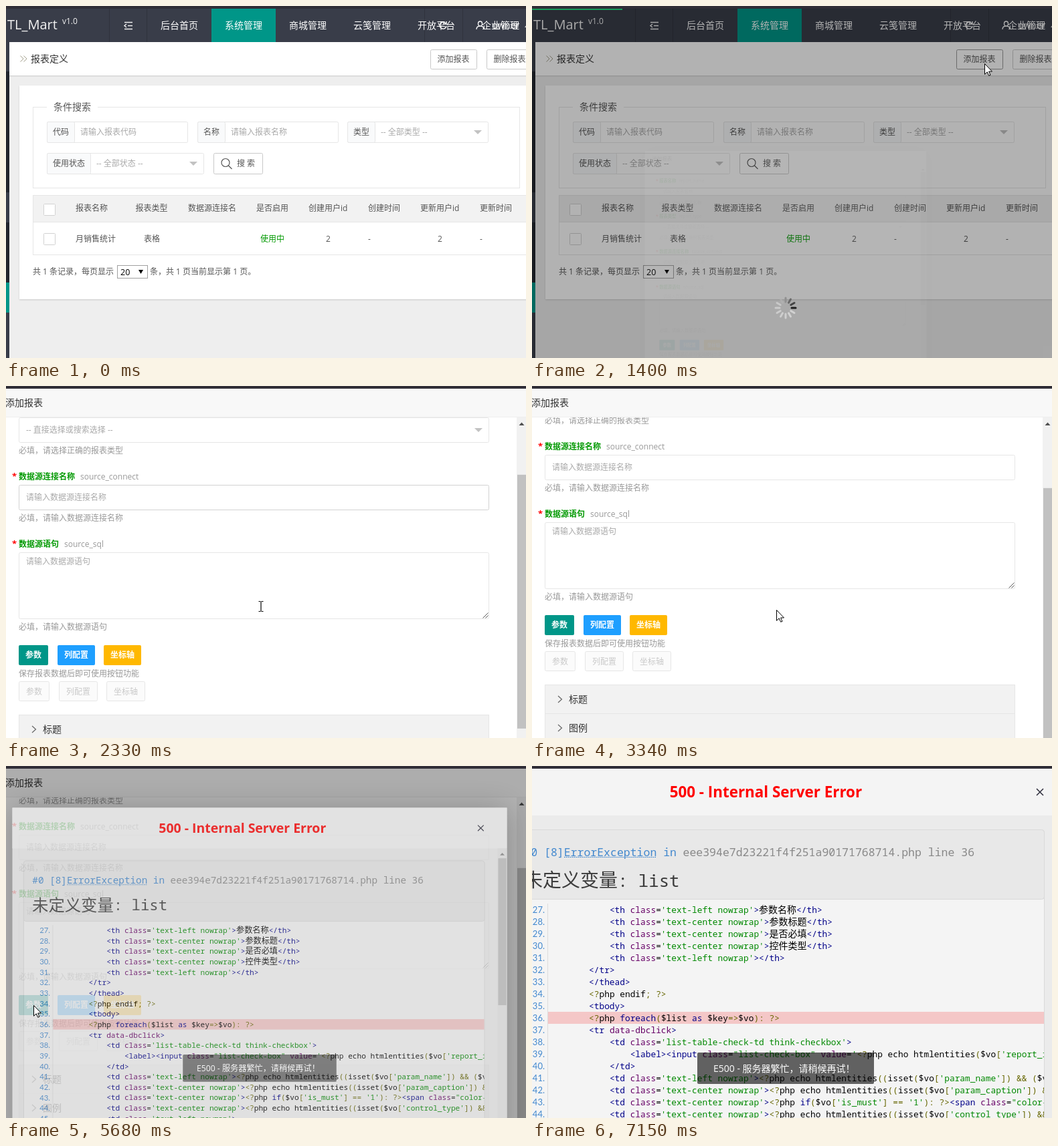
Animation of 777x527 px, one loop 7550 ms. Source, as an HTML page:

```html
<!DOCTYPE html>
<html lang="zh-CN">
<head>
<meta charset="utf-8">
<title>报表定义</title>
<style>
html, body { margin: 0; width: 100%; height: 100%; overflow: hidden; background: #eee; }
svg { display: block; width: 777px; height: 527px; font-family: "Open Sans", "Noto Sans CJK SC", "Noto Sans CJK", sans-serif; }
text { white-space: pre; }
.mono { font-family: "Noto Sans Mono", "Noto Sans CJK SC", monospace; }
.bold { font-weight: 700; }
.sheet { filter: drop-shadow(1px 1px 25px rgba(0, 0, 0, .3)); }
</style>
</head>
<body>
<svg id="stage" viewBox="0 0 777 527"></svg>
<script>
const LOOP = 7550, STEP = 77.75, CX = 379, CY = 452;
const stage = document.getElementById('stage');

function el(parent, tag, attrs = {}, content) {
  const e = document.createElementNS('http://www.w3.org/2000/svg', tag);
  for (const k in attrs) e.setAttribute(k, attrs[k]);
  if (content != null) e.textContent = content;
  parent.append(e);
  return e;
}
const group = (p, attrs) => el(p, 'g', attrs);
const rect = (p, x, y, width, height, fill, more) => el(p, 'rect', { x, y, width, height, fill, ...more });
const box = (p, x, y, w, h, fill, stroke, rx = 1) =>
  rect(p, x + .5, y + .5, w - 1, h - 1, fill, { stroke, rx });
const path = (p, d, stroke, more) => el(p, 'path', { d, fill: 'none', stroke, ...more });
// y is the vertical middle of the line
const text = (p, x, y, s, size = 12, fill = '#555', more) =>
  el(p, 'text', { x, y: y + size * .37, 'font-size': size, fill, ...more }, s);
const caret = (p, x, y) => path(p, `M${x} ${y}h12l-6 6z`, 'none', { fill: '#c2c2c2' });

// ---------- list page ----------
const page = group(stage);
rect(page, 0, 0, 777, 527, '#eee');

[[54, 44, '#393d49'], [98, 181, '#23262e'], [279, 45, '#393d49'], [324, 90, '#23262e'],
 [414, 45, '#009688'], [459, 68, '#393d49']].forEach(([y, h, c]) => rect(page, 0, y, 5, h, c));

rect(page, 5, 105, 772, 1, '#e2e2e2');
rect(page, 5, 104, 772, 1, '#d6d6d6');
rect(page, 5, 54, 772, 50, '#fff');
path(page, 'M21.5 74.500l4.500 4.500l-4.500 4.500M26.500 74.500l4.500 4.500l-4.500 4.500', '#a3a08c');
text(page, 37, 79, '报表定义', 14, '#333');
const addBtn = box(page, 634, 65, 70, 30, '#fff', '#c9c9c9', 2);
text(page, 644.5, 80, '添加报表');
box(page, 718, 65, 70, 30, '#fff', '#c9c9c9', 2);
text(page, 728.5, 80, '删除报表');

rect(page, 0, 4, 777, 50, '#393d49');
rect(page, 307, 4, 96, 50, '#009688');
[154, 210, 625, 682].forEach(x => rect(page, x, 4, 1, 50, '#30333d'));
text(page, 2, 28, 'TL_Mart', 20, '#f2f2f2');
text(page, 84, 23, 'v1.0', 12, '#f2f2f2');
path(page, 'M177 24.500h12M182 29.500h7M177 34.500h12M180 27l-3 2.500l3 2.500', '#eee', { 'stroke-width': 1.5 });
['后台首页', '系统管理', '商城管理', '云笺管理', '开放平台'].forEach((s, i) =>
  text(page, 231 + 96 * i, 29, s, 14, '#fff'));
path(page, 'M657 26a5 5 0 1 0 1 4M658 23v4h-4', '#fff', { 'stroke-width': 1.4 });
path(page, 'M703 35q0-5 5.500-5t5.500 5M705.500 26.500a3 3.500 0 1 0 6 0a3 3.500 0 1 0-6 0', '#fff', { 'stroke-width': 1.3 });
text(page, 711, 29, '企业管理', 14, '#fff');
text(page, 726, 29, 'owner', 14, '#fff');
path(page, 'M775 32l3-4l3 4z', 'none', { fill: '#ddd' });

rect(page, 20, 119, 760, 320, '#fff', { style: 'filter:drop-shadow(0 1px 1px rgba(0,0,0,.15))' });
box(page, 40, 151, 728, 122, 'none', '#e6e6e6', 0);
rect(page, 61, 149, 76, 5, '#fff');
text(page, 71, 151, '条件搜索', 14);

function field(x, y, w, labelW, label, hint, isSelect) {
  box(page, x, y, w, 32, '#fff', '#e6e6e6', 2);
  box(page, x, y, labelW, 32, '#f9fafb', '#e6e6e6', 2);
  text(page, x + 9, y + 16, label);
  text(page, x + labelW + 8, y + 16, hint, 12, '#a9a9a9');
  if (isSelect) caret(page, x + w - 22, y + 13);
}
field(61, 173, 211, 42, '代码', '请输入报表代码');
field(286, 173, 211, 42, '名称', '请输入报表名称');
field(510, 173, 211, 42, '类型', '-- 全部类型 --', true);
field(61, 220, 235, 66, '使用状态', '-- 全部状态 --', true);
box(page, 310, 220, 74, 32, '#fff', '#c9c9c9', 2);
path(page, 'M322 234.500a6 6 0 1 0 12 0a6 6 0 1 0-12 0M332.500 239l5 5', '#555', { 'stroke-width': 1.2 });
text(page, 345, 236, '搜 索');

box(page, 40, 283, 760, 90, '#fff', '#e6e6e6', 0);
box(page, 40, 283, 760, 41, '#f2f2f2', '#e6e6e6', 0);
[296, 340].forEach(y => box(page, 56, y, 18, 18, '#fff', '#d2d2d2', 1));
[[104, '报表名称'], [193.5, '报表类型'], [272, '数据源连接名'], [374, '是否启用'], [452, '创建用户id'],
 [541, '创建时间'], [619, '更新用户id'], [708, '更新时间']].forEach(([x, s]) => text(page, x, 303, s));
[[104, '月销售统计'], [206, '表格'], [380, '使用中', '#090'], [478, '2'], [541, '-'], [645, '2'], [708, '-']]
  .forEach(([x, s, c]) => text(page, x, 348.5, s, 12, c));
text(page, 40, 398, '共 1 条记录，每页显示');
box(page, 166, 388, 46, 20, '#fff', '#a0a0a0', 0);
text(page, 171, 398, '20', 12.5, '#000');
path(page, 'M198 395h7l-3.500 6z', 'none', { fill: '#000' });
text(page, 215, 398, '条，共 1 页当前显示第 1 页。');

const bar = rect(page, 0, 4, 0, 2, '#22df80');
const pageShade = rect(stage, 0, 4, 777, 523, '#000', { 'fill-opacity': .3 });

// ---------- form layer ----------
const form = group(stage);
rect(form, -22, 4, 802, 896, '#fff', { class: 'sheet' });
const body = group(form);

function heading(y, label, name) {
  text(body, 9, y - 1, '*', 13, '#f00', { class: 'bold' });
  text(body, 19, y, label, 12, '#090', { class: 'bold' });
  text(body, 27 + label.length * 12, y, name, 12, '#999');
}
function row(y, label, name, hint, help, h = 38) {
  heading(y, label, name);
  const b = box(body, 19, y + 12, 703, h, '#fff', '#e6e6e6', 2);
  text(body, 30, y + (h > 38 ? 26 : 31), hint, 12, '#a9a9a9');
  text(body, 19, y + h + 24, help, 12, '#999');
  return b;
}
row(89, '报表名称', 'report_name', '请输入报表名称', '必填，请输入报表名称');
row(190, '报表类型', 'report_type', '-- 直接选择或搜索选择 --', '必填，请选择正确的报表类型');
caret(body, 700, 218);
const linkInput = row(291, '数据源连接名称', 'source_connect', '请输入数据源连接名称', '必填，请输入数据源连接名称');
row(392, '数据源语句', 'source_sql', '请输入数据源语句', '必填，请输入数据源语句', 100);
path(body, 'M712.500 502.500l8-8M716.500 502.500l4-4', '#555');

let paramBtn;
[[19, 44, '参数', '#009688'], [77, 56, '列配置', '#1e9fff'], [146, 56, '坐标轴', '#ffb800']].forEach(([x, w, s, c], i) => {
  const b = rect(body, x, 543, w, 30, c, { rx: 2 });
  if (!i) paramBtn = b;
  text(body, x + 10, 558, s, 12, '#fff', { class: 'bold' });
});
text(body, 19, 585.5, '保存报表数据后即可使用按钮功能', 12, '#999');
[[19, 46, '参数'], [79, 58, '列配置'], [150, 58, '坐标轴']].forEach(([x, w, s]) => {
  box(body, x, 597, w, 30, '#fbfbfb', '#e6e6e6', 2);
  text(body, x + 11, 612.5, s, 12, '#c9c9c9');
});
['标题', '图例', '提示框', '工具栏', '网格'].forEach((s, i) => {
  const y = 647 + 43 * i;
  box(body, 19, y, 703, 44, '#f2f2f2', '#e6e6e6', 0);
  path(body, `M39 ${y + 17}l5.500 5l-5.500 5`, '#666', { 'stroke-width': 1.2 });
  text(body, 55, y + 22, s, 14, '#333');
});

rect(form, 763, 47, 17, 853, '#f1f1f1');
const thumb = rect(form, 764, 64, 15, 380, '#c1c1c1');
path(form, 'M766.500 59h8l-4-4.500z', 'none', { fill: '#505050' });
rect(form, -22, 4, 802, 42, '#f8f8f8');
rect(form, -22, 46, 802, 1, '#eee');
text(form, -1, 25, '添加报表', 14, '#333');

const formShade = rect(stage, 0, 4, 777, 523, '#000', { 'fill-opacity': .3 });

// ---------- error layer ----------
const fault = group(stage);
rect(fault, -46, 4, 850, 896, '#ebebeb', { class: 'sheet' });
rect(fault, -46, 4, 850, 70, '#f4f4f4');
text(fault, 205.7, 39, '500 - Internal Server Error', 22.4, '#f00', { class: 'bold' });
path(fault, 'M754 34l10 10M764 34l-10 10', '#2e2d3c', { 'stroke-width': 1.5 });
rect(fault, 788, 74, 16, 826, '#e6e6e6');
rect(fault, 789, 91, 14, 253, '#c1c1c1');
path(fault, 'M792 86h8l-4-4.500z', 'none', { fill: '#888' });
box(fault, -27, 95, 793, 800, '#f4f4f4', '#d9d9d9', 4);
box(fault, -27, 95, 793, 105, '#e8e8e8', '#d9d9d9', 4);

const mono = (x, y, s, size, fill) => text(fault, x, y, s, size, fill, { class: 'mono' });
mono(-11.7, 129, '#0 [8]ErrorException in', 16.5, '#4288ce');
path(fault, 'M48 136.500h137', '#4288ce', { 'stroke-dasharray': '2 1' });
mono(225.5, 129, 'eee394e7d23221f4f251a90171768714.php line 36', 16.5, '#888');
text(fault, -12, 171, '未定义变量', 28, '#3c3c3c');
mono(128, 171, ': list', 25.7, '#3c3c3c');

const th = (side, s) => `            <th class='text-${side} nowrap'>${s}</th>`;
const td = (side, s) => `            <td class='text-${side} nowrap'>${s}`;
const cell = name => `<?php echo htmlentities((isset($vo['${name}']) && ($vo['${name}`;
const code = [
  th('left', '参数名称'), th('center', '参数标题'), th('center', '是否必填'), th('center', '控件类型'), th('left', ''),
  '        </tr>', '        </thead>', '        <?php endif; ?>', '        <tbody>',
  '        <?php foreach($list as $key=>$vo): ?>', '        <tr data-dbclick>',
  "            <td class='list-table-check-td think-checkbox'>",
  "                <label><input class=\"list-check-box\" value='<?php echo htmlentities($vo['report_id']",
  '            </td>', td('left', cell('param_name')), td('center', cell('param_caption')),
  td('center', "<?php if($vo['is_must'] == '1'): ?><span class=\"color-green\">"),
  td('center', cell('control_type')), td('left', ''),
  '        </tr>', '        <?php endforeach; ?>', '        </tbody>'
];
const tokens = /('[^'<]*'?|"[^"]*"?)|(=>|<\?|\?>|==|[;():\[\]&]+)|(<\/?[a-z]+|>)|\b(foreach|as|if)\b|\b(class|value|data-dbclick)\b|([\u4e00-\u9fff]+)/g;
const inks = ['#080', '#660', '#008', '#008', '#606', '#000'];

const clip = el(el(stage, 'defs'), 'clipPath', { id: 'codeClip' });
rect(clip, -26, 200, 791, 690, '#000');
const listing = group(fault, { 'clip-path': 'url(#codeClip)' });
rect(listing, 23, 206, 1, 694, '#ddd');
rect(listing, 24, 368, 742, 18, '#f4c7c7');
code.forEach((line, i) => {
  const y = 215 + 18 * i;
  text(listing, 19, y, 27 + i + '.', 13, '#4288ce', { 'text-anchor': 'end', 'font-family': 'Lato, sans-serif' });
  const t = text(listing, 23.5, y, '', 12.83, '#000', { class: 'mono' });
  const add = (s, fill, size) => s && el(t, 'tspan', size ? { fill, 'font-size': size } : { fill }, s);
  let pos = 0;
  for (const m of line.matchAll(tokens)) {
    add(line.slice(pos, m.index), '#000');
    add(m[0], inks[m.slice(1).findIndex(v => v != null)], m[6] && 14);
    pos = m.index + m[0].length;
  }
  add(line.slice(pos), '#000');
});

const toast = group(stage);
rect(toast, 247, 429, 264, 47, '#000', { 'fill-opacity': .6, rx: 2 });
text(toast, 271, 452.5, 'E500 - 服务器繁忙，请稍候再试！', 14, '#fff');

// ---------- spinner, top edge, pointer ----------
const spinner = group(stage, { transform: `translate(${CX} ${CY})` });
const spokes = Array.from({ length: 12 }, (_, i) =>
  path(spinner, 'M9 0H15', '#000', { 'stroke-width': 3, 'stroke-linecap': 'round', transform: `rotate(${i * 30})` }));
rect(stage, 0, 0, 777, 4, '#302e37');

const pointer = group(stage);
const ring = el(pointer, 'circle', { r: 12, fill: '#ff0', 'fill-opacity': .6 });
const solid = { fill: '#fff', 'stroke-linejoin': 'round' };
const arrow = path(pointer, 'M.500 .500V16.300L4.200 12.800L6.700 18.300L9 17.300L6.600 12H11.500Z', '#000', solid);
const hand = path(pointer, 'M-.7 13V2.700a1.700 1.700 0 0 1 3.400 0V8.500a1.500 1.500 0 0 1 3 .2a1.500 1.500 0 0 1 3 .6a1.400 1.400 0 0 1 2.800 .8V16C11.500 19 9.500 20 9.500 23H.5C.5 20-3 17-5 13.500a1.600 1.600 0 0 1 2.600-1.600Z', '#000', solid);
const beam = path(pointer, 'M-3.500-7.500H-.5M.5-7.500H3.500M0-7V7M-3.500 7.500H-.5M.5 7.500H3.500', '#000', { 'stroke-width': 1.2 });

// ---------- motion, counted in screen refreshes ----------
const route = [[1, 711, 358], [3, 697, 215], [5, 680, 108], [7, 676, 86], [22, 676, 86], [24, 580, 169],
  [26, 420, 295], [27, 381, 330], [41, 381, 330], [43, 365, 335], [44, 365, 335], [45, 340, 328], [48, 200, 315],
  [51, 20, 332], [52, 5, 352], [53, 24, 364], [54, 41, 358], [77, 41, 358], [78, 90, 356], [80, 234, 360],
  [85, 234, 360], [86, 262, 355], [88, 430, 380], [90, 640, 460], [91, 708, 508], [92, 711, 545]];
const scrolling = [[28, 0], [29, 40], [30, 155], [31, 255], [32, 300], [36, 300], [37, 285], [38, 245], [39, 210], [40, 200]];
const loading = [[15, 0], [16, 40], [18, 135], [20, 620], [21, 777]];

function at(keys, n, col = 1) {
  const i = keys.findIndex(k => k[0] > n);
  if (i < 0) return keys[keys.length - 1][col];
  if (!i) return keys[0][col];
  const a = keys[i - 1], b = keys[i];
  return a[col] + (b[col] - a[col]) * (n - a[0]) / (b[0] - a[0]);
}
const clamp = v => Math.min(1, Math.max(0, v));
function ease(p) {
  p = clamp(p);
  let lo = 0, hi = 1;
  for (let i = 0; i < 20; i++) {
    const u = (lo + hi) / 2;
    if (.75 * u * (1 - u) + u ** 3 < p) lo = u; else hi = u;
  }
  return .3 * lo * (1 - lo) ** 2 + 3 * lo * lo * (1 - lo) + lo ** 3;
}
const show = (e, on) => e.setAttribute('display', on ? 'inline' : 'none');
const within = (n, a, b) => n >= a && n <= b;
const mix = (a, b, k) => `rgb(${a.map((v, i) => Math.round(v + (b[i] - v) * clamp(k)))})`;

function pop(layer, t, start) {
  const k = ease((t - start) / 300), s = .5 + k / 2;
  show(layer, t > start);
  layer.setAttribute('opacity', k > .999 ? 1 : k);
  layer.setAttribute('transform', k > .999 ? '' : `translate(${CX} ${CY}) scale(${s}) translate(${-CX} ${-CY})`);
}

function draw(ms) {
  const n = Math.min(92, Math.floor((ms + 8) / STEP)), t = n * STEP;

  addBtn.setAttribute('stroke', mix([201, 201, 201], [153, 153, 153], n < 22 ? (n - 6) / 3 : 0));
  show(bar, within(n, 16, 21));
  bar.setAttribute('width', at(loading, n));
  show(pageShade, n >= 16);
  pop(form, t, 1380);

  const y = at(scrolling, n);
  body.setAttribute('transform', `translate(0 ${-y})`);
  thumb.setAttribute('y', 64 + y * .444);
  linkInput.setAttribute('stroke', within(n, 27, 30) ? '#d2d2d2' : '#e6e6e6');
  paramBtn.setAttribute('fill', mix([0, 150, 136], [51, 171, 160], n < 68 ? (n - 52) / 2 : 0));

  show(formShade, n >= 68);
  pop(fault, t, 5543);
  pop(toast, t, 5543);

  show(spinner, within(n, 16, 19) || within(n, 68, 71));
  spokes.forEach((s, i) => {
    const age = (((n - 18 - i) % 12) + 12) % 12, g = Math.min(222, 30 + age * 38);
    s.setAttribute('stroke', `rgb(${g},${g},${g})`);
    s.setAttribute('stroke-opacity', age < 4 ? 1 : .45 + age * .03);
  });

  const isHand = within(n, 7, 15) || within(n, 53, 67), isBeam = within(n, 27, 30);
  show(pointer, n > 0);
  pointer.setAttribute('transform', `translate(${at(route, n, 1)} ${at(route, n, 2)})`);
  show(ring, n === 15 || n === 67);
  show(hand, isHand);
  show(beam, isBeam);
  show(arrow, !isHand && !isBeam);
}

const begin = performance.now();
function tick() {
  draw((performance.now() - begin) % LOOP);
  requestAnimationFrame(tick);
}
draw(0);
requestAnimationFrame(tick);
</script>
</body>
</html>
```
